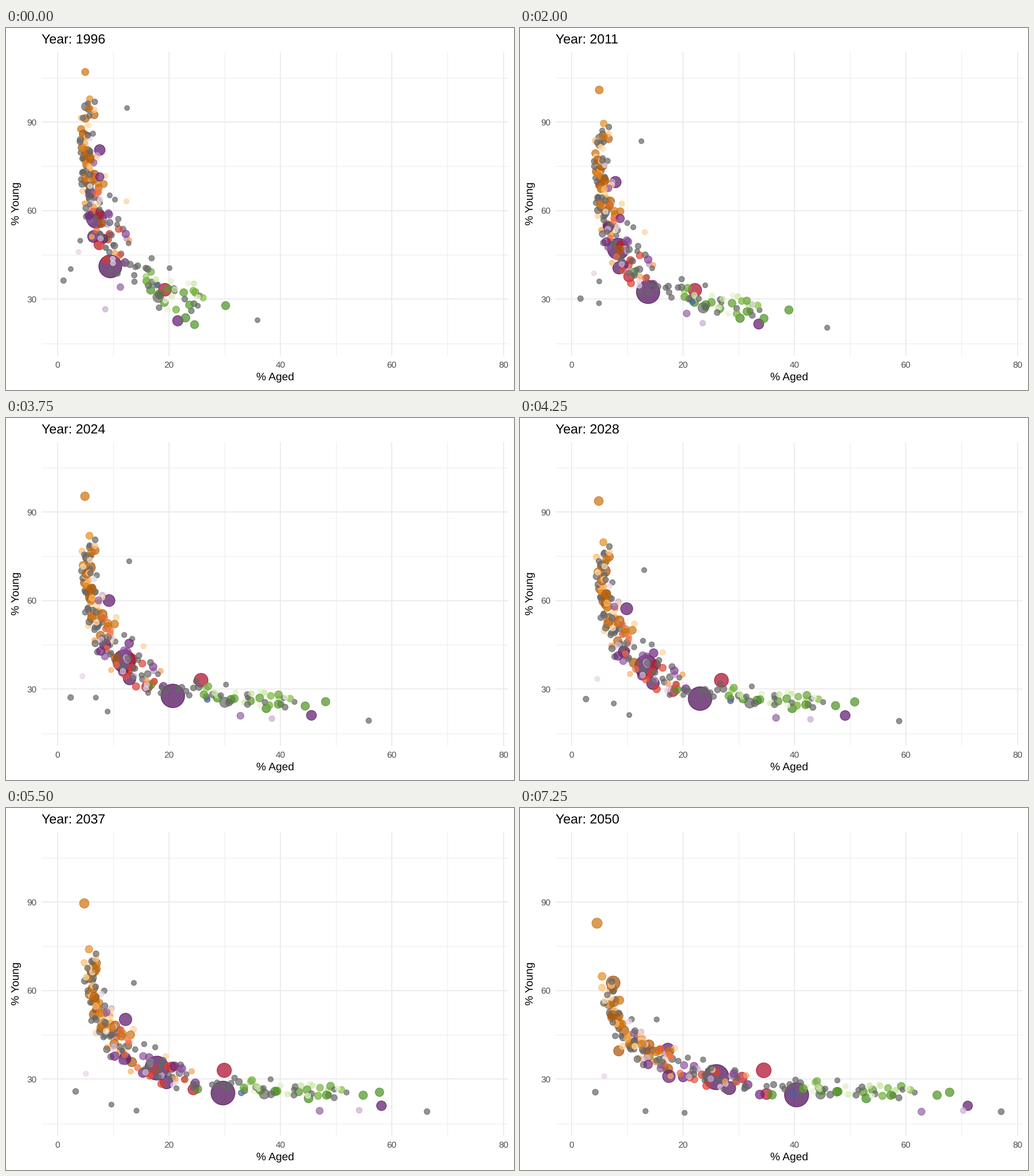
Recreate the animation shown at these times as a matplotlib script. Size 885x632 px, loop 7500 ms.

```python
import numpy as np
import matplotlib.pyplot as plt
from matplotlib.animation import FuncAnimation
from matplotlib.colors import to_rgb

W, H, DPI = 885, 632, 100
PT = 72 / DPI                      # points per pixel
FRAMES, INTERVAL = 30, 250
FIRST_YEAR, LAST_YEAR = 1996, 2050
FONT = "Liberation Sans"
STROKE = 1.24

plt.rcParams["text.hinting"] = "none"

# Dark shades go to the most populous places of a region.
AFRICA = ["#7F3B08", "#B35806", "#E08214", "#FDB863", "#FEE0B6"]
AMERICAS = ["#A50026", "#D73027", "#F46D43", "#FDAE61"]
ASIA = ["#40004B", "#762A83", "#9970AB", "#C2A5CF", "#E7D4E8"]
EUROPE = ["#276419", "#4D9221", "#7FBC41", "#B8E186", "#E6F5D0"]
OCEANIA = ["#313695", "#4575B4"]
GREY = ["#666666"]

rng = np.random.default_rng(5)
dots = []                          # (colour, radii, aged, young) per step
T = np.linspace(0, 1, FRAMES)


def shade(ramp, radius):
    """Colour from a ramp, darker for larger dots."""
    tone = np.interp(radius, [5, 5.6, 6.5, 8, 12], [1, .75, .45, .2, .03])
    rgb = np.array([to_rgb(c) for c in ramp])
    pos = np.linspace(0, 1, len(ramp))
    return tuple(np.interp(tone, pos, rgb[:, i]) for i in range(3))


def young_at_start(rank):
    return 94 - 67 * rank ** .9


def rank_of(young):
    return np.clip((94 - young) / 67, 0, 1) ** (1 / .9)


def mover(ramp, radius, start, end, growth=1.05):
    """Add a dot going from start to end, both as (aged, young).

    Young places age late and lose children steadily; older places age
    evenly and have their fall in births early on.
    """
    (x0, y0), (x1, y1) = start, end
    rank = rank_of(y0)
    aged = x0 + (x1 - x0) * T ** (3 - 1.9 * rank)
    young = y1 + (y0 - y1) * (1 - T) ** (.9 + 2.4 * rank ** 2)
    radii = radius * (1 + (growth - 1) * T)
    dots.append((shade(ramp, radius), radii, aged, young))


def crowd(ramp, count, low, high, r_max, growth=1.05):
    """Add dots ranked low (young) to high (aged) in the transition."""
    for i in range(count):
        rank = low + (high - low) * (i + rng.random()) / count
        dx, dy = np.clip(rng.normal(size=2), -1.7, 1.7)
        radius = 4.9 + (r_max - 4.9) * rng.random() ** 1.3
        start = ((5.2 + 18.5 * rank ** 3) * np.exp(.15 * dx),
                 young_at_start(rank) * np.exp(.08 * dy))
        x = 6 * 10 ** rank
        end = (x * np.exp(.08 * dx), (21 + 250 / x) * np.exp(.06 * dy))
        mover(ramp, radius, start, end, growth)


# Large places and those that stand apart
mover(ASIA, 20.7, (9.5, 41.1), (40.4, 24.7))
mover(ASIA, 18, (7, 57.4), (26, 30.7), 1.26)
mover(ASIA, 11, (6.5, 51.2), (28.3, 27), 1.1)
mover(ASIA, 10, (7.6, 80.5), (17.3, 40), 1.2)
mover(ASIA, 9, (6, 66), (17.5, 31), 1.3)
mover(ASIA, 9.7, (21.6, 22.7), (71.1, 21), .92)
mover(ASIA, 8, (7.6, 71.4), (33.8, 24.8))
mover(ASIA, 6.5, (11.3, 34.1), (62.8, 19))
mover(ASIA, 5.5, (8.6, 26.6), (70.3, 19.4))
mover(ASIA, 5, (3.8, 46), (5.9, 31))
mover(AMERICAS, 11.8, (19.3, 33.2), (34.5, 33), 1.15)
mover(AMERICAS, 9.8, (7.5, 48.5), (35, 25))
mover(AMERICAS, 9.3, (7.4, 58.8), (30.6, 30.6))
mover(OCEANIA, 5.6, (17.8, 34.7), (39.8, 25.2))
mover(EUROPE, 8, (23, 23.7), (52.9, 23.5))
mover(EUROPE, 7.7, (24.6, 21.4), (65.6, 24.6))
mover(EUROPE, 7.7, (8.6, 50.6), (36, 24.7))
mover(AFRICA, 8.7, (5.4, 80.1), (7.5, 62.6), 1.45)
mover(AFRICA, 8, (5, 85.4), (8.5, 39.6), 1.2)
mover(AFRICA, 6.8, (5, 106.9), (4.6, 82.8), 1.4)
mover(AFRICA, 6.2, (5.8, 97.8), (5.5, 64.8), 1.2)
mover(AFRICA, 5.2, (12.4, 63.1), (25.3, 33.2))
mover(GREY, 8, (5.1, 95.2), (7.3, 52.4), 1.3)
mover(GREY, 10, (18.1, 30.7), (44.7, 24.9), .9)
mover(GREY, 4.9, (35.9, 22.9), (77.1, 19), 1.2)
mover(GREY, 5.5, (1.1, 36.3), (4.3, 25.6))
mover(GREY, 4.9, (2.4, 40.2), (20.3, 18.6))
mover(GREY, 4.9, (4.1, 49.8), (13.3, 19.2))
mover(GREY, 4.9, (12.5, 94.7), (15.3, 50.2))

# Everyone else
crowd(AFRICA, 46, 0, .44, 8, 1.18)
crowd(AMERICAS, 20, .28, .72, 7.2)
crowd(ASIA, 24, .2, .74, 8.6)
crowd(EUROPE, 27, .84, 1, 8.2)
crowd(GREY, 80, .02, 1, 6.5)

# Mixed stacking, with the largest circles at the back.
rng.shuffle(dots)
dots.sort(key=lambda d: (d[1][0] < 15, d[1][0] < 9.5))
colours, radii, aged, young = zip(*dots)
radii, aged, young = map(np.array, (radii, aged, young))


def to_x(v):
    return 89.5 + 9.7125 * v


def to_y(v):
    return 628.2 - 5.158 * v


fig = plt.figure(figsize=(W / DPI, H / DPI), dpi=DPI, facecolor="white")
ax = fig.add_axes([0, 0, 1, 1])
ax.set_xlim(0, W)
ax.set_ylim(H, 0)
ax.axis("off")


def grid(xs, ys, width):
    style = dict(color="#EBEBEB", lw=width * PT, solid_capstyle="butt",
                 zorder=1)
    for v in xs:
        ax.plot([to_x(v)] * 2, [41.5, 572], **style)
    for v in ys:
        ax.plot([62, 875], [to_y(v)] * 2, **style)


def label(x, y, text, size, colour="black", **kw):
    return ax.text(x, y, text, fontsize=size * PT, color=colour, family=FONT,
                   va="baseline", **kw)


grid(range(10, 80, 20), range(15, 106, 30), .95)
grid(range(0, 81, 20), range(30, 91, 30), 1.9)
for v in range(0, 81, 20):
    label(to_x(v), 592.5, str(v), 15.4, "#4D4D4D", ha="center")
for v in range(30, 91, 30):
    label(53.5, to_y(v) + 5.5, str(v), 15.4, "#4D4D4D", ha="right")
label(468.5, 615, "% Aged", 19.2, ha="center")
label(23.5, 306.5, "% Young", 19.2, ha="center", rotation=90,
      rotation_mode="anchor")
title = label(62, 26.5, "", 23.1)

cloud = ax.scatter(aged[:, 0], young[:, 0], c=colours, alpha=.7,
                   linewidths=STROKE * PT, zorder=2)
cloud.set_edgecolor(cloud.get_facecolor())


def update(n):
    year = FIRST_YEAR + round((LAST_YEAR - FIRST_YEAR) * T[n])
    title.set_text(f"Year: {year}")
    cloud.set_offsets(np.column_stack([to_x(aged[:, n]), to_y(young[:, n])]))
    cloud.set_sizes(((2 * radii[:, n] - STROKE) * PT) ** 2)
    return cloud, title


anim = FuncAnimation(fig, update, frames=FRAMES, interval=INTERVAL,
                     repeat=True, repeat_delay=0)
plt.show()
```
